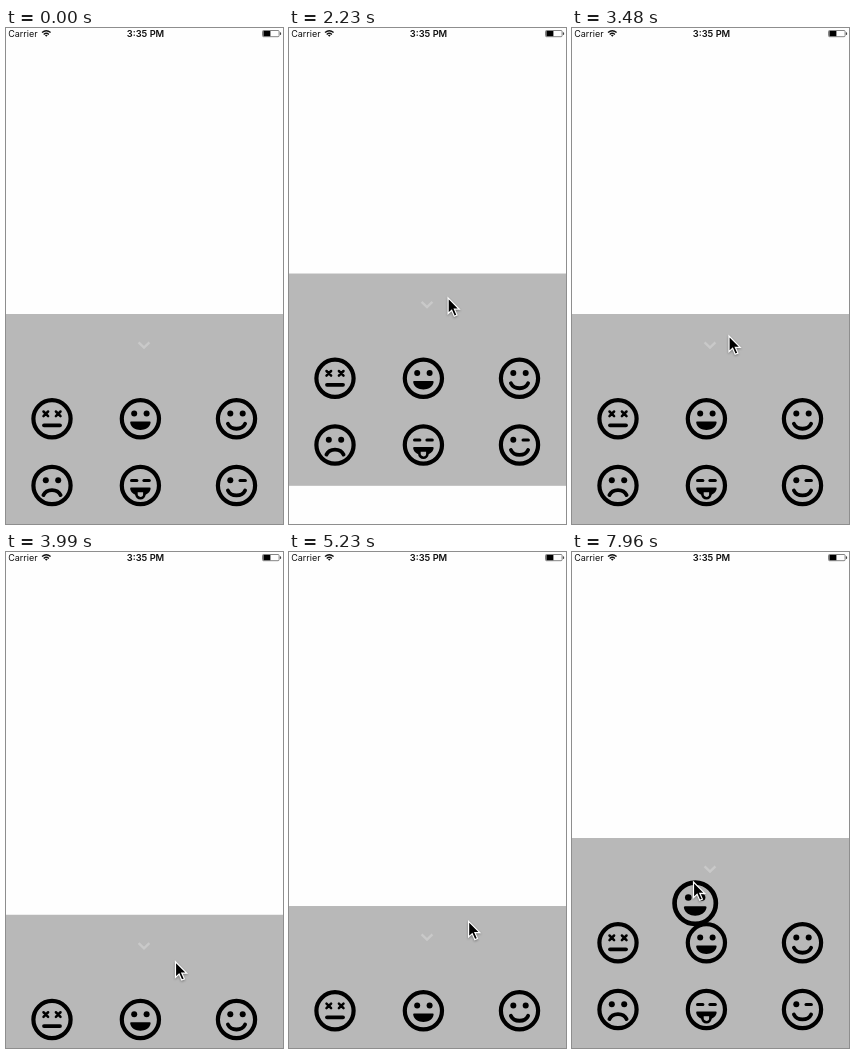
Write an HTML page that moves like this. It is 277 px wide and 496 px high and loops after 8 s.

```html
<!DOCTYPE html>
<html lang="en">
<head>
<meta charset="utf-8">
<title>Emoji tray</title>
<style>
  html, body { margin: 0; width: 100%; height: 100%; overflow: hidden; background: #fefefe; }
  svg { display: block; width: 100%; height: 100%; }
  text { font-family: Inter, Roboto, sans-serif; fill: #111; }
  .line { fill: none; stroke: #000; stroke-width: 3.8; stroke-linecap: round; stroke-linejoin: round; }
</style>
</head>
<body>
<svg viewBox="0 0 277 496">
  <defs>
    <circle id="ring" r="18.6" class="line" style="stroke-width:4.2"/>
    <circle id="eye" r="3"/>
    <path id="dash" d="M-2.7 0H2.7" class="line" style="stroke-width:3"/>
    <path id="cross" d="M-2.3 -2.3L2.3 2.3M2.3 -2.3L-2.3 2.3" class="line" style="stroke-width:2.5"/>
    <g id="eyes"><use href="#eye" x="-6.2" y="-5.2"/><use href="#eye" x="6.2" y="-5.2"/></g>
    <path id="curve" d="M-8.6 5C-5.5 11.6 5.5 11.6 8.6 5" class="line"/>

    <g id="dead"><use href="#ring"/><use href="#cross" x="-6.2" y="-5"/><use href="#cross" x="6.2" y="-5"/>
      <path d="M-8 6.5H8" class="line"/></g>
    <g id="grin"><use href="#ring"/><use href="#eyes"/>
      <path d="M-9.2 2.6H9.2Q10.5 2.6 10.2 4C8.5 13.6 -8.5 13.6 -10.2 4Q-10.5 2.6 -9.2 2.6Z"/></g>
    <g id="smile"><use href="#ring"/><use href="#eyes"/><use href="#curve"/></g>
    <g id="sad"><use href="#ring"/><use href="#eyes"/>
      <path d="M-8.6 9.6C-5.5 3 5.5 3 8.6 9.6" class="line"/></g>
    <g id="tongue"><use href="#ring"/><use href="#dash" x="-6.2" y="-5"/><use href="#dash" x="6.2" y="-5"/>
      <path d="M-9.2 2H9.2Q10.5 2 10.2 3.4C8.5 12.4 -8.5 12.4 -10.2 3.4Q-10.5 2 -9.2 2Z"/>
      <path d="M-4 5.5H4V8.7A4 4 0 0 1 -4 8.7Z" fill="#b8b8b8" stroke="#000" stroke-width="2.6"/></g>
    <g id="wink"><use href="#ring"/><use href="#eye" x="-6.2" y="-5.2"/><use href="#dash" x="6.2" y="-5"/>
      <use href="#curve"/></g>
  </defs>

  <rect width="277" height="496" fill="#fefefe"/>
  <text x="2.2" y="9" font-size="9">Carrier</text>
  <g fill="none" stroke="#111" stroke-width="1.3">
    <path d="M36 4.6Q40.3 .8 44.6 4.6M37.7 6.4Q40.3 4.1 42.9 6.4"/>
    <path d="M40.3 8.8L38.9 7.3Q40.3 6.2 41.7 7.3Z" fill="#111" stroke="none"/>
  </g>
  <text x="139.5" y="9" font-size="9.3" font-weight="600" text-anchor="middle">3:35 PM</text>
  <rect x="256.5" y="2.5" width="16.6" height="6.2" rx="1" fill="none" stroke="#666" stroke-width=".8"/>
  <rect x="257.4" y="3" width="7" height="5.2"/>
  <rect x="273.9" y="4.3" width="1.2" height="2.6" rx=".6" fill="#444"/>

  <g id="tray">
    <rect width="277" height="212.3" fill="#b8b8b8"/>
    <path d="M132.6 28.4L138 33.6L143.4 28.4" fill="none" stroke="#c9c9c9" stroke-width="2.4"/>
    <use href="#dead" x="46" y="104.8"/><use href="#grin" x="134.4" y="104.8"/><use href="#smile" x="230.5" y="104.8"/>
    <use href="#sad" x="46" y="171.5"/><use href="#tongue" x="134.4" y="171.5"/><use href="#wink" x="230.5" y="171.5"/>
  </g>
  <use id="copy" href="#grin"/>
  <path id="cursor" d="M0 0V15.6L3.6 12.3L6.2 18.3L8.9 17.1L6.3 11.3H11.2Z" stroke="#fff" stroke-width="1.2"
    style="filter:drop-shadow(0 1px 1px rgba(0,0,0,.35))"/>
</svg>
<script>
const LOOP = 8000;
const ease = {
  linear: u => u,
  in: u => u * u,
  out: u => u * (2 - u),
  both: u => u < .5 ? 2 * u * u : 1 - 2 * (1 - u) ** 2
};

// Each key is [time, values, easing towards this key]; a missing easing holds.
const cursorKeys = [
  [750, [195, 408]], [860, [155, 410], 'out'],
  [1080, [155, 410]], [1570, [147, 322], 'both'],
  [2010, [147, 322]], [2230, [159, 270.5], 'in'], [2350, [171, 201.5], 'linear'],
  [3010, [171, 201.5]], [3480, [157, 308], 'both'],
  [3710, [157, 308]], [3990, [169.5, 409], 'in'], [4130, [169, 461], 'out'],
  [4640, [169, 461]], [4730, [169, 466], 'linear'],
  [5010, [169, 466]], [5230, [179.5, 370], 'in'], [5340, [186, 335], 'out'],
  [6040, [186, 335]], [6080, [182.5, 332.5], 'linear'], [6230, [165, 346], 'out'],
  [6450, [165, 346]], [7060, [139, 392], 'both'],
  [7860, [139, 392]], [7960, [121.5, 330], 'in']
];
const trayKeys = [
  [2080, [286]], [2230, [246], 'in'], [2370, [177], 'linear'], [2608, [286], 'both'],
  [3770, [286]], [3990, [362], 'in'], [4170, [429], 'out'],
  [5060, [429]], [5230, [355], 'in'], [5370, [286], 'out']
];
const copyKeys = [[7880, [134.4, 390.8, 1]], [7960, [123.2, 351.3, 1.11], 'in']];

function sample(keys, t) {
  const next = keys.findIndex(key => key[0] > t);
  if (next === 0) return keys[0][1];
  if (next < 0) return keys.at(-1)[1];
  const [t0, from] = keys[next - 1], [t1, to, name] = keys[next];
  if (!name) return from;
  const u = ease[name]((t - t0) / (t1 - t0));
  return from.map((v, i) => v + (to[i] - v) * u);
}

const [tray, copy, cursor] = ['tray', 'copy', 'cursor'].map(id => document.getElementById(id));

function place(el, x, y, scale = 1) {
  el.setAttribute('transform', `translate(${x} ${y}) scale(${scale})`);
}

function draw(now) {
  const t = now % LOOP;
  place(tray, 0, ...sample(trayKeys, t));
  place(copy, ...sample(copyKeys, t));
  place(cursor, ...sample(cursorKeys, t));
  copy.style.display = t < copyKeys[0][0] ? 'none' : '';
  cursor.style.display = t < cursorKeys[0][0] ? 'none' : '';
}

const start = performance.now();
function tick() {
  draw(performance.now() - start);
  requestAnimationFrame(tick);
}
tick();
</script>
</body>
</html>
```
